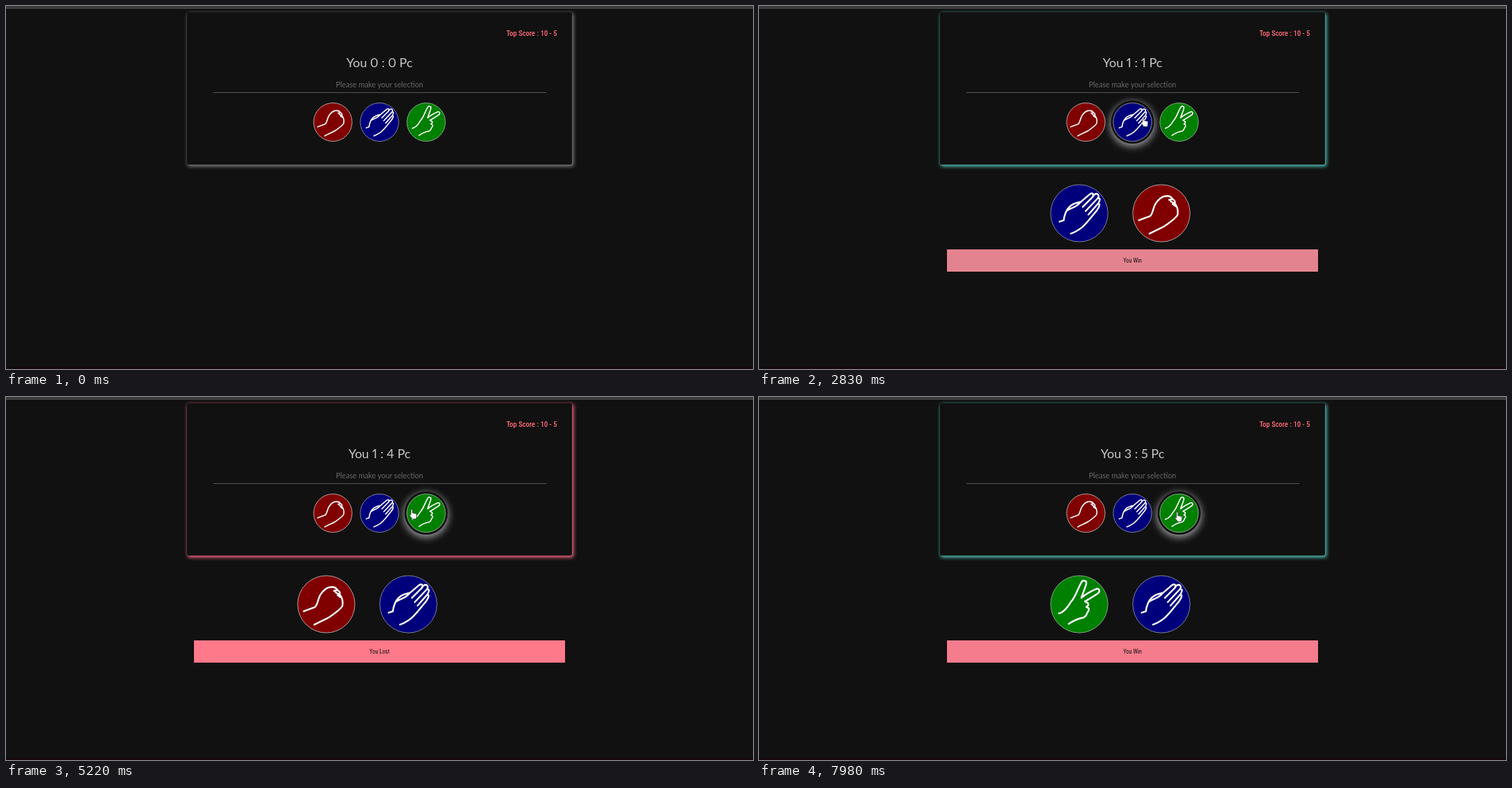
An HTML page for the animation above (8 s loop, 1073 px wide and 522 px high).

```html
<!DOCTYPE html>
<html lang="en">
<head>
<meta charset="utf-8">
<title>Rock, paper, scissors</title>
<style>
html, body { margin: 0; width: 100%; height: 100%; overflow: hidden; background: #111; }
#stage { position: relative; width: 1073px; height: 522px; overflow: hidden; background: #111; }
#stage > * { position: absolute; box-sizing: border-box; }
#top { left: 0; top: 0; width: 100%; height: 4px; background: #393939; border-bottom: 1px solid #4a4a4a; }
#bottom { left: 0; bottom: 0; width: 100%; height: 3px; background: #14080c; }
#card { left: 260px; top: 9px; width: 553px; height: 219px; border-radius: 3px; background: #111; }
#best { right: 281.5px; top: 32px; color: #ff6b75; white-space: nowrap;
  font: 500 10.5px/16px "Roboto Condensed", Roboto, sans-serif; font-stretch: 75%; }
#score { left: 260px; width: 553px; top: 69px; text-align: center; color: #c8c8c8;
  font: 18px/24px Lato, sans-serif; font-variant-numeric: proportional-nums; }
#hint { left: 260px; width: 553px; top: 105px; text-align: center; color: #686868; font: 10.65px/16px Lato, sans-serif; }
#rule { left: 298px; top: 124px; width: 478px; height: 1px; background: #555; }
.hand { left: 0; top: 0; border-radius: 50%; }
.hand svg { display: block; width: 100%; height: 100%; overflow: visible; }
.hover { box-shadow: 0 0 0 3px #111, 0 3px 11px 4px #a0a0a4; }
#bar { left: 270px; top: 350px; width: 533px; height: 32px; text-align: center; color: #111;
  font: 8.4px/32px "Roboto Condensed", Roboto, sans-serif; font-stretch: 75%; }
#cursor { left: 0; top: 0; width: 20px; height: 20px; overflow: visible; }
</style>
</head>
<body>
<div id="stage">
  <div id="top"></div>
  <div id="bottom"></div>
  <div id="card"></div>
  <div id="best">Top Score : 10 - 5</div>
  <div id="score"></div>
  <div id="hint">Please make your selection</div>
  <div id="rule"></div>
  <div id="bar"></div>
  <svg id="cursor" fill="#fff" stroke="#222" stroke-width=".7" stroke-linejoin="round">
    <path id="pointer" d="M-3.4 -6.5C-3.4 -8 -1.2 -8 -1.2 -6.5V-2.4L3.2 -1.4C4.6 -1 5 -.3 4.8 1L4 6.5H-1.4L-5 1.6C-5.8 .2 -4.6 -.6 -3.4 .6Z"/>
    <path id="arrow" d="M-3 -7V5L-.3 2.6L1.6 6.8L3.4 6L1.6 1.9H5.2Z"/>
  </svg>
</div>
<script>
const LOOP = 8000, FADE = 420;
const $ = id => document.getElementById(id);

// Fill, rim and outline around the centre of a disc of radius 41
const hands = {
  rock: ['#800000', '#d8c8c8', 'M-32 10L-16 4C-12 1 -12 -8 -8 -14C-4 -20 1 -23 4 -24C9 -25 14 -24 16 -20L11 -19M16 -20C20 -18 20 -15 18 -14L13 -17M19 -14C23 -9 24 -4 23 2C22 6 12 13 5 18C-2 22 -10 25 -17 29M20 -10L16 -13'],
  paper: ['#00007c', '#9c9cba', 'M-28 12L-22 10C-21 2 -18 -5 -14 -9C-9 -14 -4 -15 2 -16M-17 -4C-11 -8 -4 -8 2 -16L15 -27C19 -30 22 -26 19 -23L5 -9M19 -24C25 -31 30 -26 26 -21L9 -3M26 -21C31 -23 29 -17 27 -14L13 2M27 -14C31 -13 27 -7 25 -4C18 4 14 10 9 15C3 22 -4 26 -12 29'],
  scissors: ['#008000', '#9cc49c', 'M-29 13C-23 12 -16 4 -12 -3C-6 -9 -3 -20 3 -31C5 -35 11 -34 10 -29C8 -22 5 -15 3 -9C10 -15 18 -19 25 -22C29 -22 30 -18 26 -15C20 -11 14 -7 8 -4C12 -2 16 0 10 4C15 5 14 9 12 11C10 13 12 16 6 19C0 20 -8 23 -15 28']
};
const outcomes = {
  none: { glow: '#777', bar: [17, 17, 17], text: '' },
  lost: { glow: '#e4607a', bar: [254, 121, 138], text: 'You Lost' },
  win: { glow: '#4fb3aa', bar: [99, 181, 171], text: 'You Win' },
  draw: { glow: '#dda32e', bar: [217, 193, 88], text: "It's a draw" }
};

// time, fade head start, score, player's hand, computer's hand, outcome
const rounds = [
  [0, 0, '0 : 0', '', '', 'none'],
  [1400, 0, '0 : 1', 'rock', 'paper', 'lost'],
  [2830, 108, '1 : 1', 'paper', 'rock', 'win'],
  [3630, 0, '1 : 2', 'rock', 'paper', 'lost'],
  [4260, 0, '1 : 3', 'rock', 'paper', 'lost'],
  [4820, 0, '1 : 4', 'rock', 'paper', 'lost'],
  [5390, 150, '2 : 4', 'scissors', 'paper', 'win'],
  [6480, 0, '2 : 4', 'rock', 'rock', 'draw'],
  [7340, 0, '2 : 5', 'paper', 'scissors', 'lost'],
  [7920, 0, '3 : 5', 'scissors', 'paper', 'win']
];

// time, x, y of the mouse
const path = [
  [330, 928, 236], [970, 474, 166], [2350, 474, 166], [2670, 554, 167],
  [3100, 554, 167], [3550, 481, 170], [4420, 481, 170], [4500, 522, 169],
  [4580, 483, 169], [4900, 483, 169], [5220, 585, 169], [6020, 585, 169],
  [6230, 540, 168], [6400, 540, 168], [6480, 480, 170], [7030, 480, 170],
  [7200, 521, 170], [7340, 530, 170], [7500, 530, 170], [7740, 603, 173]
];

const clamp = v => Math.max(0, Math.min(1, v));
const smooth = v => v * v * (3 - 2 * v);
const mix = (a, b, k) => a + (b - a) * k;

function disc(x, y, r) {
  const el = document.createElement('div');
  el.className = 'hand';
  el.style.cssText = `width:${2 * r}px;height:${2 * r}px;transform:translate(${x - r}px,${y - r}px)`;
  $('stage').insertBefore(el, $('cursor'));
  return { el, x, y, r, kind: '' };
}

function setHand(d, kind) {
  if (d.kind === kind) return;
  d.kind = kind;
  if (!kind) { d.el.innerHTML = ''; return; }
  const [fill, edge, line] = hands[kind];
  const rim = 33 / d.r;
  d.el.innerHTML = `<svg viewBox="-41 -41 82 82"><circle r="${41 - rim / 2}" fill="${fill}" stroke="${edge}" stroke-width="${rim}"/>
    <path d="${line}" fill="none" stroke="#fff" stroke-width="2.4" stroke-linecap="round" stroke-linejoin="round"/></svg>`;
}

const buttons = Object.keys(hands).map((kind, i) => {
  const d = disc(469.5 + 67 * i, 167, 28);
  setHand(d, kind);
  return d;
});
const mine = disc(460, 298, 41.5), theirs = disc(578, 298, 41.5);

function mouseAt(t) {
  const i = path.findIndex(p => p[0] > t);
  if (i < 0) return path[path.length - 1].slice(1);
  if (i === 0) return null;
  const [a, b] = [path[i - 1], path[i]];
  const k = smooth((t - a[0]) / (b[0] - a[0]));
  return [mix(a[1], b[1], k), mix(a[2], b[2], k)];
}

function drawRound(t) {
  const n = rounds.filter(r => r[0] <= t).length - 1;
  const [at, lead, score, you, pc, result] = rounds[n];
  const now = outcomes[result], before = outcomes[rounds[Math.max(0, n - 1)][5]];
  const k = smooth(clamp((t - at + lead) / FADE));
  $('score').textContent = `You ${score} Pc`;
  $('card').style.boxShadow = `1.5px 2px 5px 1px ${now.glow}`;
  $('bar').textContent = now.text;
  $('bar').style.background = `rgb(${now.bar.map((c, i) => mix(before.bar[i], c, k))})`;
  setHand(mine, you);
  setHand(theirs, pc);
}

function drawMouse(t) {
  const pos = mouseAt(t);
  $('cursor').style.display = pos ? '' : 'none';
  let over = false;
  for (const b of buttons) {
    const hit = !!pos && Math.hypot(pos[0] - 2 - b.x, pos[1] - 6 - b.y) < b.r;
    b.el.classList.toggle('hover', hit);
    over = over || hit;
  }
  if (!pos) return;
  $('cursor').style.transform = `translate(${pos[0]}px, ${pos[1]}px)`;
  $('pointer').style.display = over ? '' : 'none';
  $('arrow').style.display = over ? 'none' : '';
}

const start = performance.now();
function frame() {
  const t = (performance.now() - start) % LOOP;
  drawRound(t);
  drawMouse(t);
  requestAnimationFrame(frame);
}
frame();
</script>
</body>
</html>
```
